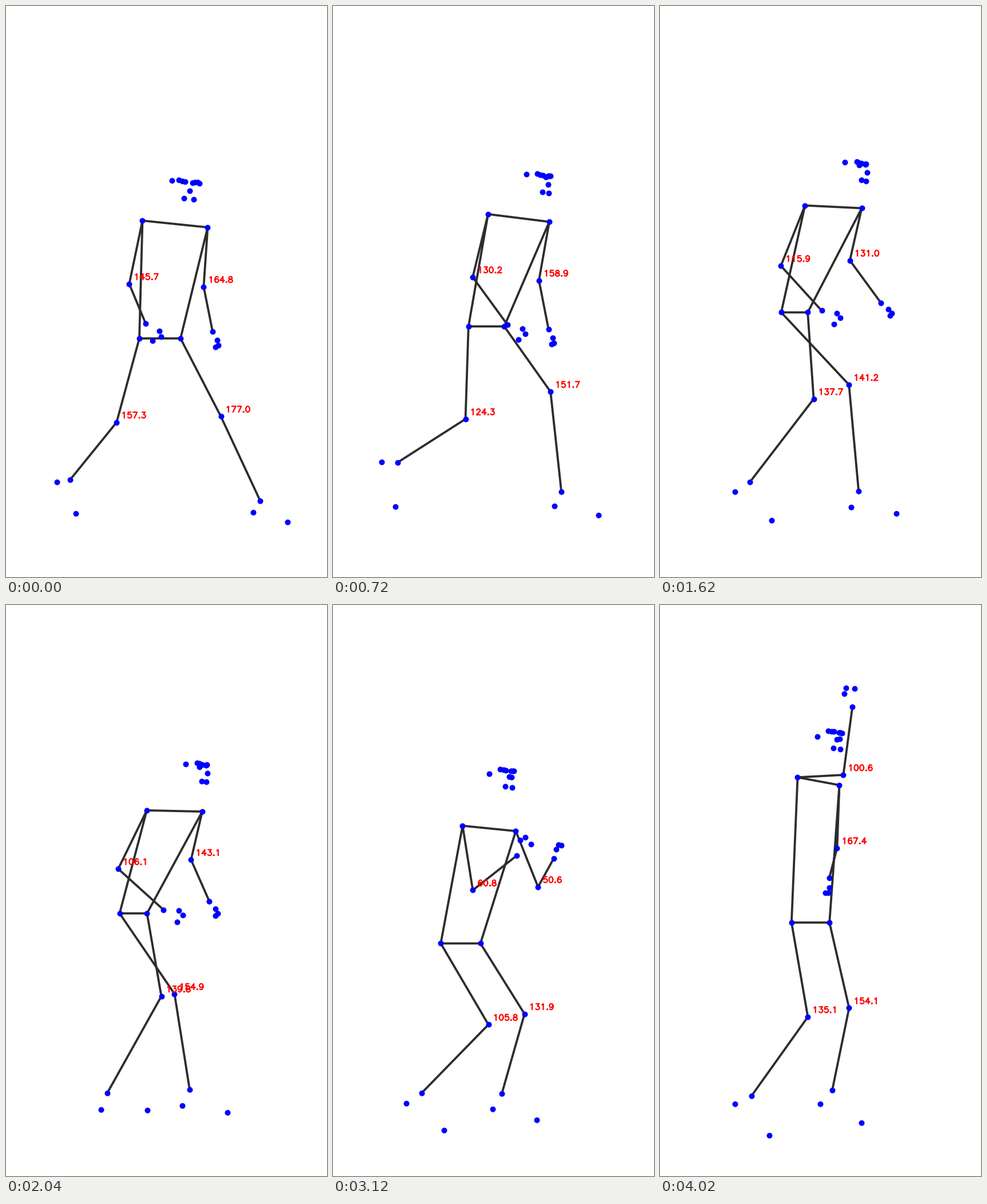
A matplotlib script for the animation above (4.08 s loop, 561x998 px).

```python
import matplotlib.pyplot as plt
import numpy as np
from matplotlib.animation import FuncAnimation

W, H, DPI = 561, 998, 64
FRAMES, STEP = 68, 60
PX = 72 / DPI
POSES = [0, 12, 27, 34, 43, 52, 67]  # stride, push, cross, settle, dip, load, raise
T = np.arange(FRAMES)


def curve(values, keys=POSES):
    """Monotone cubic through the keys, sampled at every frame."""
    k, v = np.asarray(keys, float), np.asarray(values, float)
    h = np.diff(k)
    d = np.diff(v) / h
    m = np.empty_like(v)
    m[0], m[-1] = d[0], d[-1]
    for i in range(1, len(v) - 1):
        a, b = d[i - 1], d[i]
        m[i] = 2 * a * b / (a + b) if a * b > 0 else 0
    i = np.clip(np.searchsorted(k, T, side="right") - 1, 0, len(h) - 1)
    s = (T - k[i]) / h[i]
    return (v[i] * (1 + 2 * s) * (1 - s) ** 2 + v[i + 1] * s**2 * (3 - 2 * s)
            + h[i] * s * (1 - s) * (m[i] * (1 - s) - m[i + 1] * s))


def wave(mean, amp, period, start=0):
    return mean + amp * np.cos(2 * np.pi * (T - start) / period)


def xy(x, y):
    return np.column_stack(np.broadcast_arrays(x, y, T)[:2])


def reach(length, angle):
    """Vector at an angle in degrees, 0 pointing down and 90 to the right."""
    a = np.radians(angle)
    return xy(length * np.sin(a), length * np.cos(a))


joints, labels_at = {}, {}


def add_limb(start, mid, end, upper, bend, lengths, view=0):
    """Two bones; bend is the printed joint's deviation from straight."""
    joints[mid] = start + reach(lengths[0], upper)
    joints[end] = joints[mid] + reach(lengths[1], upper + bend + view)
    labels_at[mid] = 180 - np.abs(bend)
    return upper + bend


def add_hand(wrist, forearm, fan):
    for i, (turn, length) in enumerate(fan):
        joints[f"{wrist}_finger{i}"] = joints[wrist] + reach(length, forearm + turn)


def add_foot(ankle, pitch, square):
    joints[ankle + "_toe"] = joints[ankle] + reach(curve([60, 77, 76], [0, 9, 67]), pitch)
    joints[ankle + "_heel"] = joints[ankle] + reach(curve([24, 31, 32], [0, 27, 67]), pitch - square)


def add_head(nose):
    """Features as sideways, backward and vertical distances from the nose."""
    joints["nose"] = nose
    yaw = np.radians(curve([15, 47, 61, 61, 46, 47], [0, 12, 27, 43, 52, 67]))
    tilt = curve([0, 0, 0.4, 0.45], [0, 27, 54, 67])
    features = [(25, 30, -15), (17, 11, -17), (11.5, 9, -16), (6.5, 7, -15), (8.5, 7, 14)]
    for side in (-1, 1):
        for i, (u, depth, h) in enumerate(features):
            shift = xy(side * u * np.cos(yaw) - depth * np.sin(yaw), h + tilt * depth + 0.1 * side * u)
            joints[f"face{side}_{i}"] = nose + shift


# Torso
hips = xy(curve([268.5, 267.5, 234.5, 222, 222, 222.5, 262.5]),
          curve([580.5, 559.5, 535, 538.5, 575, 591, 554.5]))
chest = xy(curve([295, 324, 302.5, 294, 274.5, 272.5, 276.5]),
           curve([380.5, 370, 350.5, 359.5, 392, 390, 307.5]))
hip_half = xy(wave(59, 13, 58) / 2, 0)
chest_half = xy(curve([114, 98, 93, 73], [0, 30, 52, 67]) / 2, wave(8, 6, 56, 8) / 2)
joints.update(hip_l=hips - hip_half, hip_r=hips + hip_half,
              shoulder_l=chest - chest_half, shoulder_r=chest + chest_half)
add_head(chest + xy(curve([26, 52, 59, 39, 37], [0, 12, 30, 52, 67]),
                    curve([-58, -60, -89, -74], [0, 27, 52, 67])))

# Arms
forearm = add_limb(
    joints["shoulder_l"], "elbow_l", "wrist_l",
    curve([-11.8, -13.7, -21.8, -26, -6.9, 9, 93]),
    curve([34.3, 49.8, 64.1, 73.9, 100.2, 119.2, 79.4]),
    (curve([113, 114, 80], [0, 52, 67]), curve([75, 103, 107, 98, 120], [0, 12, 43, 52, 67])))
add_hand("wrist_l", forearm, [(0, 32), (39, 27), (27, 35)])

swing = POSES[:-1] + [63, 67]  # the arm stays out until late, then drops
forearm = add_limb(
    joints["shoulder_r"], "elbow_r", "wrist_r",
    curve([-3.9, -10, -12.8, -13.1, 22.8, 21.7, 31, -2.1], swing),
    curve([15.2, 21.1, 49, 36.9, 97.3, 129.4, 85, -12.6], swing),
    (curve([104, 104, 82, 105, 110], [0, 12, 43, 52, 67]), curve([80, 92, 59, 54], [0, 27, 43, 67])))
add_hand("wrist_r", forearm, [(15, 17), (0, 27), (10, 26)])

# Legs: thighs swing about the pelvis centre, side says which hip carries which leg
side = curve([1, 1, -0.7, -0.7, 1, 1], [0, 12, 27, 34, 43, 67])
add_limb(
    hips, "knee_b", "ankle_b",
    curve([-27.3, -12.7, 12.5, 18.7, 15.4, 18.9, -1.6]),
    -curve([22.7, 55.7, 42.3, 40.2, 65, 74.2, 44.9]),
    (curve([165, 166, 155, 150, 165], [0, 12, 27, 52, 67]),
     curve([129, 141, 194, 167, 169], [0, 12, 34, 43, 67])),
    view=11 * side)
add_foot("ankle_b", curve([9, -3, 30, 67, 38, 24], [0, 12, 27, 34, 43, 67]), 88)
add_limb(
    hips, "knee_f", "ankle_f",
    curve([38, 44.5, 37, 27.1, 34.7, 42.2, 24.3]),
    -curve([3, 28.3, 38.8, 25.1, 32.3, 48.1, 25.9]),
    (curve([173, 160, 158, 167, 164], [0, 12, 34, 43, 67]),
     curve([163, 187, 144, 147], [0, 27, 43, 67])),
    view=-10 * side)
add_foot("ankle_f", curve([52, 60, 57, 42], [0, 20, 43, 67]), 84)

BONES = [
    ("shoulder_l", "shoulder_r"), ("hip_l", "hip_r"),
    ("shoulder_l", "hip_l"), ("shoulder_r", "hip_r"),
    ("shoulder_l", "elbow_l"), ("elbow_l", "wrist_l"),
    ("shoulder_r", "elbow_r"), ("elbow_r", "wrist_r"),
    ("knee_b", "ankle_b"), ("knee_f", "ankle_f"),
]


def arc(cx, cy, rx, ry, a0, a1):
    a = np.radians(np.linspace(a0, a1, 25))
    return np.column_stack([cx + rx * np.cos(a), cy + ry * np.sin(a)])


def stroke(*parts):
    return np.vstack([np.asarray(p, float) for p in parts])


# Single-stroke numerals on a 20 x 21 cell, y up
SIX = stroke(arc(11, 10.5, 7, 10.5, 50, 180), arc(10.5, 6.5, 6.5, 6.5, 180, -180))
GLYPHS = {
    "0": arc(10, 10.5, 7, 10.5, 0, 360),
    "1": stroke([(6, 17), (8, 18), (11, 21), (11, 0)]),
    "2": stroke(arc(10, 15, 6, 6, 170, -35), [(3, 0), (17, 0)]),
    "3": stroke([(5, 21), (16, 21), (10, 13)], arc(10, 6.5, 7, 6.5, 90, -150)),
    "4": stroke([(13, 0), (13, 21), (3, 7), (18, 7)]),
    "5": stroke([(15, 21), (5, 21), (4, 12)], arc(10, 7, 7, 7, 130, -150)),
    "6": SIX,
    "7": stroke([(3, 21), (17, 21), (7, 0)]),
    "8": stroke(arc(10, 16, 5.5, 5, -90, 270), arc(10, 5.5, 7, 5.5, 90, -270)),
    "9": (20, 21) - SIX,
    ".": arc(5, 1, 1, 1, 0, 360),
}
SCALE = 0.487
GAP = np.full((1, 2), np.nan)


def write(text, x, y):
    out = []
    for ch in text:
        out += [(x, y) + GLYPHS[ch] * (SCALE, -SCALE), GAP]
        x += SCALE * (10 if ch == "." else 20)
    return out


fig = plt.figure(figsize=(W / DPI, H / DPI), dpi=DPI, facecolor="white")
ax = fig.add_axes([0, 0, 1, 1])
ax.set_xlim(-0.5, W - 0.5)
ax.set_ylim(H - 0.5, -0.5)
ax.axis("off")
round_ends = dict(solid_capstyle="round", solid_joinstyle="round")
bones, = ax.plot([], [], color="#2d2d2d", lw=3.8 * PX, **round_ends)
dots, = ax.plot([], [], "o", color="#0000ff", ms=10 * PX, mew=0)
labels, = ax.plot([], [], color="#ff0000", lw=2.2 * PX, **round_ends)


def update(f):
    pose = {n: p[f] for n, p in joints.items()}
    thighs = zip(("hip_l", "hip_r") if side[f] > 0 else ("hip_r", "hip_l"), ("knee_b", "knee_f"))
    lines = []
    for a, b in BONES + list(thighs):
        lines += [pose[a], pose[b], GAP[0]]
    bones.set_data(*np.array(lines).T)
    dots.set_data(*np.array(list(pose.values())).T)
    ink = []
    for n, angle in labels_at.items():
        x, y = pose[n]
        ink += write(f"{angle[f]:.1f}", x + 8, y - 7.5)
    labels.set_data(*np.vstack(ink).T)
    return bones, dots, labels


anim = FuncAnimation(fig, update, frames=FRAMES, interval=STEP, repeat=True, repeat_delay=0)
plt.show()
```
